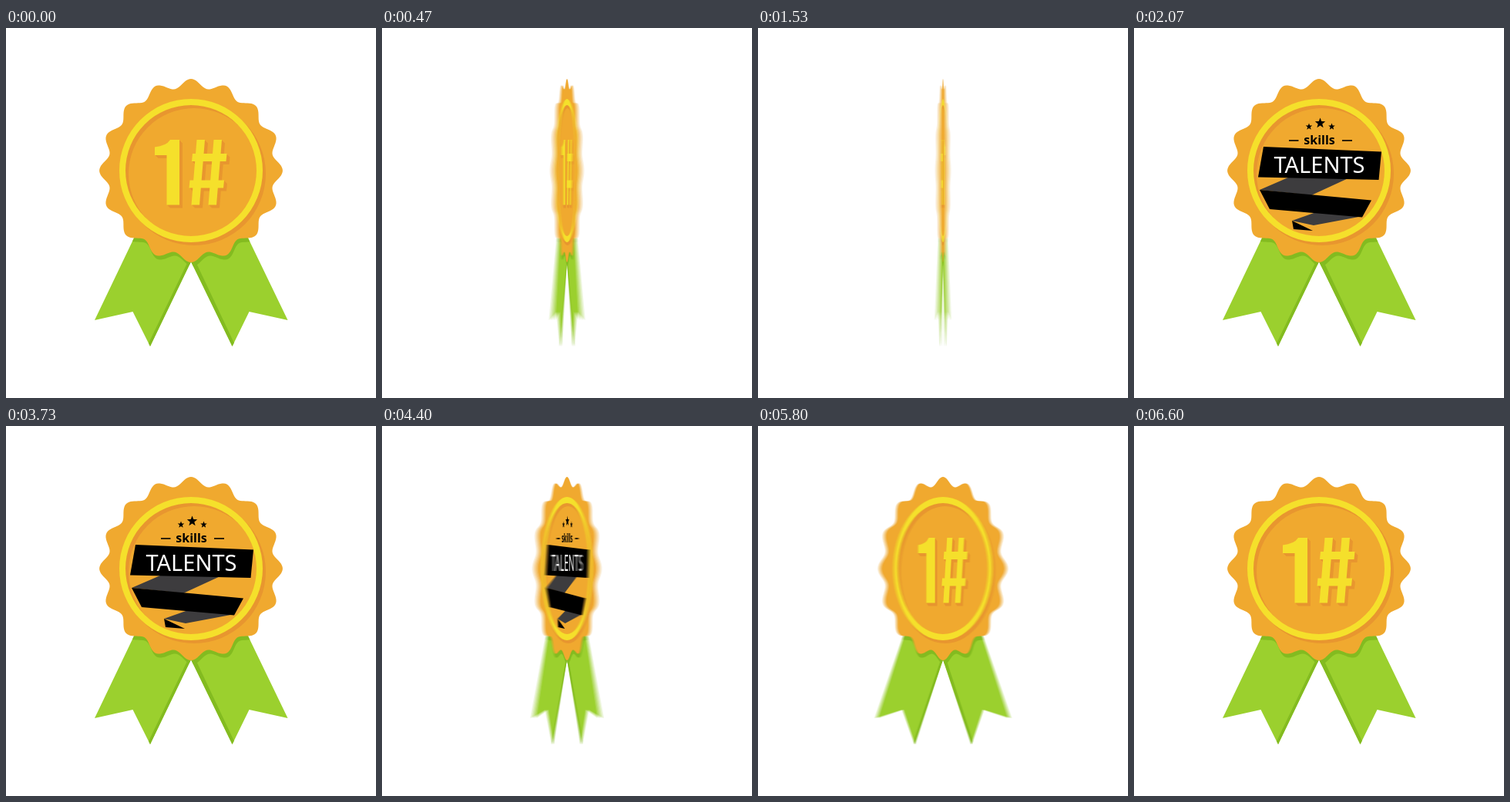
These frames come from a looping animation (480x480 px, 6.99 s). An HTML page with a canvas:

```html
<!DOCTYPE html>
<html lang="en">
<head>
<meta charset="utf-8">
<title>Spinning rosette</title>
<style>
  html, body { margin: 0; width: 100%; height: 100%; overflow: hidden; background: #fff; }
  canvas { display: block; width: 480px; height: 480px; }
</style>
</head>
<body>
<canvas id="stage"></canvas>
<script>
const SIZE = 480, CX = 240, CY = 185;
const LOOP = 6990, STEP = 200 / 3;
const SPIN_STEPS = 31, SECOND_SPIN = 60;
const SHUTTER = 5, SAMPLES = 8;          // motion blur, in degrees and passes
const ORANGE = '#f0a92f', DEEP = '#e8962f', YELLOW = '#f5e02b';
const GREEN = '#9bd02e', LEAF = '#83bb20', GREY = '#3d3c3e';

const dpr = window.devicePixelRatio || 1;
const stage = document.getElementById('stage');
const layer = document.createElement('canvas');
stage.width = stage.height = layer.width = layer.height = SIZE * dpr;
const out = stage.getContext('2d');
const g = layer.getContext('2d');

function poly(points) {
  const p = new Path2D();
  points.forEach(([x, y], i) => i ? p.lineTo(x, y) : p.moveTo(x, y));
  p.closePath();
  return p;
}

function fill(path, color, dx = 0, dy = 0) {
  g.save();
  g.translate(dx, dy);
  g.fillStyle = color;
  g.fill(path);
  g.restore();
}

function scallop() {
  const pts = [];
  for (let i = 0; i < 360; i++) {
    const a = i * Math.PI / 180;
    const r = 113.3 + 5.6 * Math.cos(16 * a);
    pts.push([CX + r * Math.sin(a), CY - r * Math.cos(a)]);
  }
  return poly(pts);
}

function star(x, y, r) {
  const pts = [];
  for (let i = 0; i < 10; i++) {
    const a = i * Math.PI / 5, q = i % 2 ? r * 0.42 : r;
    pts.push([x + q * Math.sin(a), y - q * Math.cos(a)]);
  }
  return poly(pts);
}

const badge = scallop();
const leftTail = poly([[115, 379], [164.5, 368], [187, 413], [240, 303], [240, 260], [172, 260]]);
const rightTail = poly([[365.5, 379], [315.5, 368], [293.5, 413], [240, 303], [240, 260], [308, 260]]);
const leftEdge = poly([[187, 413], [185, 409], [236, 303], [240, 303]]);
const rightEdge = poly([[293.5, 413], [295.8, 408.5], [246, 303], [240, 303]]);

const ring = new Path2D();
ring.arc(CX, CY, 93, 0, 7);
ring.closePath();
ring.moveTo(CX + 85, CY);
ring.arc(CX, CY, 85, 0, -7, true);

const one = new Path2D('M225 145 V229.5 H208.5 V165 H193 V154.5 Q208 153 213 145 Z');
const hash = new Path2D();
for (const x of [247.5, 269.5])
  hash.addPath(poly([[x, 145], [x + 10.5, 145], [x + 3.5, 229.5], [x - 7, 229.5]]));
for (const [x, y] of [[242, 163], [238.5, 197.5]])
  hash.addPath(poly([[x, y], [x + 44.5, y], [x + 43.5, y + 10], [x - 1, y + 10]]));

const folds = [
  [GREY, poly([[200, 194], [280, 194], [230, 217], [163, 210]])],
  [GREY, poly([[236, 239], [297, 244], [233, 256], [205, 250]])],
  ['#000', poly([[168, 154], [321, 160.5], [317.5, 197], [161, 193.5]])],
  ['#000', poly([[163, 210], [308, 223.5], [296, 245.5], [176, 235]])],
  ['#000', poly([[205, 250], [232, 263], [207, 261]])],
  ['#000', star(241.5, 123.5, 7)],
  ['#000', star(227, 128, 4.5)],
  ['#000', star(256.5, 128, 4.5)]
];

function label(text, x, y, font, color) {
  g.font = font;
  g.fillStyle = color;
  g.textAlign = 'center';
  g.fillText(text, x, y);
}

function drawTails() {
  for (const [tail, edge] of [[leftTail, leftEdge], [rightTail, rightEdge]]) {
    fill(tail, GREEN);
    fill(edge, LEAF);
    g.save();
    g.clip(tail);
    fill(badge, LEAF, 2, 5);
    g.restore();
  }
}

function drawNumber() {
  for (const shape of [one, hash]) {
    for (let d = 4; d > 0; d--) fill(shape, DEEP, d, d);
  }
  fill(one, YELLOW);
  fill(hash, YELLOW);
}

function drawTalents() {
  for (const [color, shape] of folds) fill(shape, color);
  g.fillStyle = '#000';
  g.fillRect(201, 145.2, 12.5, 1.6);
  g.fillRect(270, 145.2, 13, 1.6);
  label('skills', 240.5, 151, 'bold 16px "Noto Sans", "Open Sans", sans-serif', '#000');
  label('TALENTS', 240.5, 188, '29px "Noto Sans", "Open Sans", sans-serif', '#fff');
}

function drawMedal(deg, talents) {
  g.setTransform(dpr, 0, 0, dpr, 0, 0);
  g.fillStyle = '#fff';
  g.fillRect(0, 0, SIZE, SIZE);
  g.translate(CX, 0);
  g.scale(Math.cos(deg * Math.PI / 180), 1);
  g.translate(-CX, 0);
  drawTails();
  fill(badge, ORANGE);
  fill(ring, DEEP, 4, 4);
  fill(ring, YELLOW);
  talents ? drawTalents() : drawNumber();
}

function render(ms) {
  const k = Math.floor((ms % LOOP + 5) / STEP);
  const second = k >= SECOND_SPIN;
  const turn = Math.min(1, (second ? k - SECOND_SPIN : k) / SPIN_STEPS) * 360;
  const moving = turn > 0 && turn < 360;
  const passes = moving ? SAMPLES : 1;
  for (let i = 0; i < passes; i++) {
    const deg = moving ? turn + SHUTTER * ((i + 0.5) / passes - 0.5) : turn;
    // the face is swapped while the medal is edge-on
    drawMedal(deg, second ? deg < 90 : deg > 270);
    out.globalAlpha = 1 / (i + 1);
    out.drawImage(layer, 0, 0);
  }
}

const start = performance.now();
function tick() {
  render(performance.now() - start);
  requestAnimationFrame(tick);
}
tick();
</script>
</body>
</html>
```
